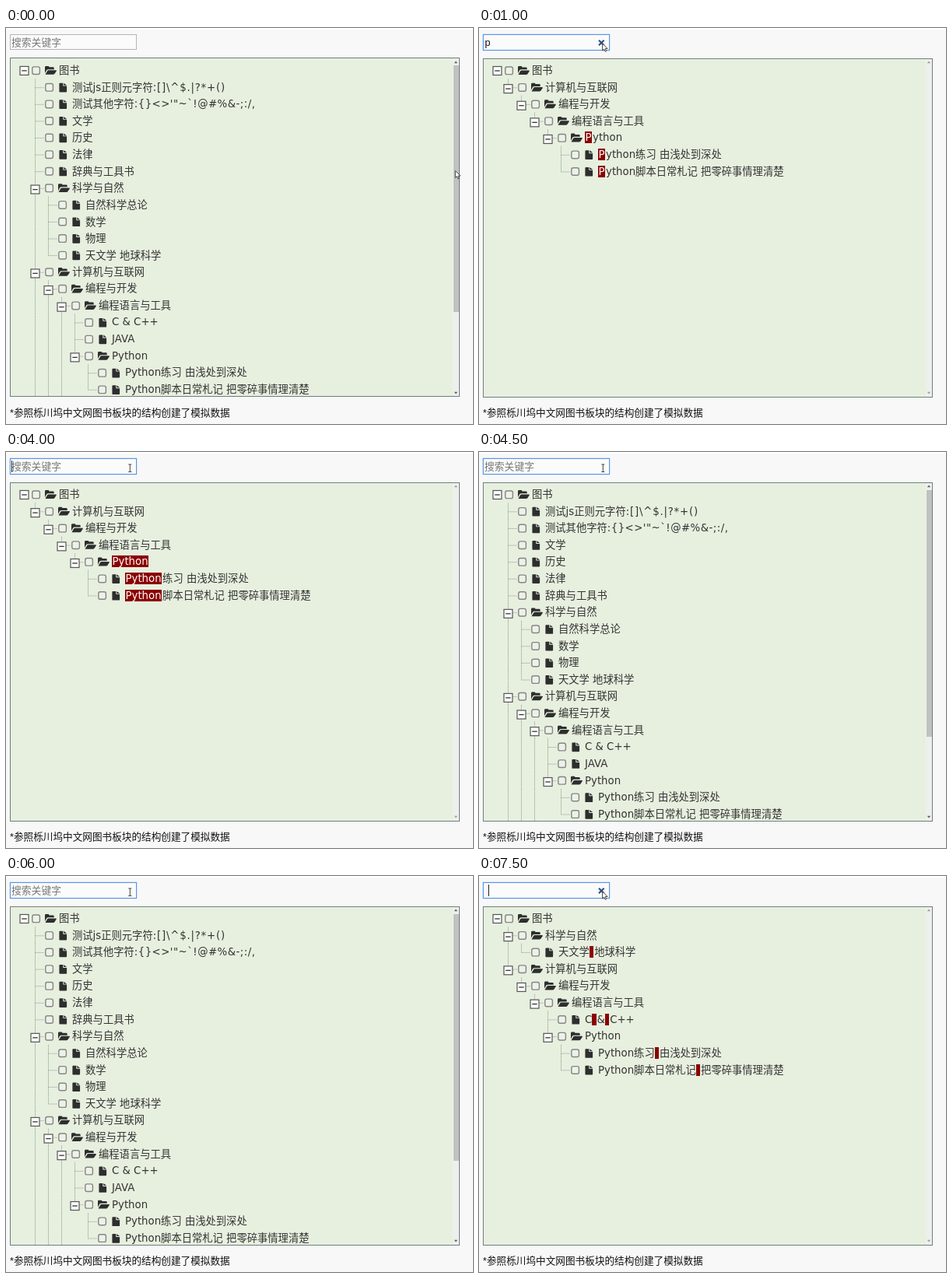
Animation of 600 by 509 pixels, one loop 8 s. Source, as an HTML page:

```html
<!DOCTYPE html>
<html lang="zh-CN">
<head>
<meta charset="utf-8">
<title>Tree search</title>
<style>
html, body { margin: 0; width: 100%; height: 100%; overflow: hidden; background: #f8f8f8; }
#stage {
  position: absolute; left: 0; top: 0; width: 600px; height: 509px; overflow: hidden;
  background: linear-gradient(#fff 2px, #f8f8f8 2px);
}
#scene { position: absolute; inset: 0; }
#scene div, #scene svg, .label { position: absolute; box-sizing: border-box; }
#scene > svg { left: 0; top: 0; }
#box {
  left: 5px; top: 8px; width: 163px; height: 21px; background: #fbfbfb;
  border: 1px solid #5596e6; box-shadow: 0 0 1px #5596e6;
}
#query {
  left: 7.5px; top: 9px; line-height: 19px; white-space: pre; color: #111;
  font-size: 12.8px; font-family: "Liberation Sans", "Noto Sans CJK SC", "Noto Sans CJK", sans-serif;
}
#query.empty { left: 7px; color: #777; }
#caret { top: 11px; width: 1px; height: 15px; background: #222; }
#panel { left: 5px; top: 39px; width: 578px; height: 436px; border: 1px solid #6c7f7c; background: #e7f0df; }
#bar { left: 573.5px; top: 40px; width: 8.5px; height: 434px; background: #eeefec; }
#thumb { left: 574.5px; top: 48.5px; width: 7px; height: 317px; background: #c0c1c0; }
#tree { inset: 0; clip-path: inset(40px 27px 35px 6px); transform-origin: 0 0; }
.label {
  white-space: pre; line-height: 22px; color: #333;
  font-size: 13.3px; font-family: "DejaVu Sans", "Noto Sans CJK SC", "Noto Sans CJK", sans-serif;
}
mark { background: #8b0000; color: #fff; padding: 0 .5px; margin-right: 1px; }
#note {
  left: 5px; top: 485px; line-height: 20px; white-space: pre; color: #111;
  font-size: 12.64px; font-family: "Liberation Sans", "Noto Sans CJK SC", "Noto Sans CJK", sans-serif;
}
/* before the field takes focus */
.idle #box { height: 20px; border-color: #b4b4b4; box-shadow: none; }
.idle #panel, .idle #bar, .idle #thumb { transform: translateY(-1px); }
.idle #tree { transform: scaleY(.9985); }
.idle #note { transform: translateY(-.5px); }
</style>
</head>
<body>
<div id="stage">
  <div id="scene">
    <div id="box"></div>
    <div id="query"></div>
    <div id="caret"></div>
    <div id="panel"></div>
    <div id="bar"></div>
    <div id="thumb"></div>
    <div id="tree"></div>
    <div id="note">*参照栎川坞中文网图书板块的结构创建了模拟数据</div>
    <svg width="600" height="509">
      <g id="arrows"><path d="M575.8 45.2h4.4l-2.2-2.6zM575.8 467.8h4.4l-2.2 2.6z"/></g>
      <path id="clear" d="M154 15.7l6.6 6.6M160.6 15.7l-6.6 6.6" stroke="#2c5285" stroke-width="2.2"/>
      <path id="beam" d="M157.3 16h4M157.3 25.5h4M159.3 16v9.5" fill="none" stroke="#444"/>
      <path id="pointer" d="M0 0v9l2.1-1.9 1.5 3.3 1.5-.7-1.4-3.2h2.8z" fill="#fff" stroke="#333" stroke-width=".9"/>
    </svg>
  </div>
</div>
<script>
const $ = id => document.getElementById(id);
const STEP = 500, PITCH = 21.62, TOP = 54.8;

// more: further siblings follow below the visible area
const node = (text, kids, extra) => ({ text, kids, ...extra });
const root = node('图书', [
  node('测试js正则元字符', null, { tail: ':[]\\^$.|?*+()', gap: .8 }),
  node('测试其他字符', null, { tail: ':{}<>\'"~`!@#%&-;:/,', gap: .48 }),
  node('文学'), node('历史'), node('法律'), node('辞典与工具书'),
  node('科学与自然', [
    node('自然科学总论'), node('数学'), node('物理'), node('天文学 地球科学')
  ]),
  node('计算机与互联网', [
    node('编程与开发', [
      node('编程语言与工具', [
        node('C & C++'), node('JAVA'),
        node('Python', [
          node('Python练习 由浅处到深处'),
          node('Python脚本日常札记 把零碎事情理清楚')
        ])
      ], { more: true })
    ], { more: true })
  ], { more: true })
]);

// [typed text, applied filter, caret shown]
const prefixes = [...'python'].map((_, i) => 'python'.slice(0, i + 1));
const states = [
  ['', '', 0], ['p', '', 1],
  ...prefixes.map(s => [s, s, 0]),
  ['', 'python', 1], ['', '', 0],
  ['&', '&', 0], ['', '&', 1],
  ['', '', 0], ['', '', 1],
  [' ', '', 1], [' ', ' ', 1]
];

const escapeHtml = s => s.replace(/&/g, '&amp;').replace(/</g, '&lt;').replace(/>/g, '&gt;');

function highlight(text, filter) {
  if (!filter) return escapeHtml(text);
  return text.split(new RegExp(`(${filter})`, 'i'))
    .map((part, i) => i % 2 ? `<mark>${escapeHtml(part)}</mark>` : escapeHtml(part)).join('');
}

const visible = (n, filter) =>
  (n.text + (n.tail || '')).toLowerCase().includes(filter) ||
  (n.kids || []).some(k => visible(k, filter));

function flatten(n, filter, depth = 0, last = true, bars = [], out = []) {
  out.push({ n, depth, last, bars });
  const kids = (n.kids || []).filter(k => visible(k, filter));
  const inner = depth && !last ? [...bars, depth] : bars;
  kids.forEach((k, i) => {
    const end = i === kids.length - 1 && !(k.more && !filter);
    flatten(k, filter, depth + 1, end, inner, out);
  });
  return out;
}

const column = depth => depth ? 20.5 + 17 * depth : 23.5;

const folder = (x, y) =>
  `<path transform="translate(${x} ${y})" fill="#2e2e2e" d="M0 3.6V-4.2q0-1.3 1.3-1.3H4.2q1.2 0 1.2 1.3H10.4q1.3 0 1.3 1.3V-1.3H4.2q-1.4 0-2.2 1.2zM.5 5.3L3 1q.6-1.2 1.8-1.2H14.2q1.2 0 .5 1.2L12.5 4.3q-.6 1-1.8 1z"/>`;
const file = (x, y) =>
  `<path transform="translate(${x} ${y})" fill="#2e2e2e" d="M1-5.8H5V-1.9H9.8V5q0 .9-.9.9H1Q.1 5.9.1 5V-4.9Q.1-5.8 1-5.8zM6-5.8L9.8-2.8H6z"/>`;

function drawRow({ n, depth, last, bars }, i, filter) {
  const y = TOP + i * PITCH, top = y - PITCH / 2, bottom = y + PITCH / 2;
  const x = column(depth), shift = 17 * depth, ey = y + (depth ? 1.7 : .2);
  let lines = bars.map(d => `M${column(d)} ${top}V${bottom}`).join('');
  if (depth) lines += `M${x} ${top}V${last ? y : bottom}M${x} ${y + .4}H${x + 11}`;
  let art = `<path d="${lines}" fill="none" stroke="#8f958b" stroke-dasharray="1 1"/>`;
  if (n.kids) {
    art += `<rect x="${x - 5.5}" y="${ey - 5.5}" width="11" height="11" fill="#fbfcfa" stroke="#555" stroke-width="1.2"/>` +
      `<path d="M${x - 3.2} ${ey}h6.4" stroke="#333" stroke-width="1.3"/>`;
  }
  art += `<rect x="${33.8 + shift}" y="${y - 4.8}" width="9.6" height="9.6" rx="2.2" fill="#edf2e8" stroke="#858585" stroke-width="1.4"/>`;
  art += n.kids ? folder(50 + shift, y - .2) : file(51.3 + shift, y + .2);
  const tail = n.tail ? `<span style="letter-spacing:${n.gap}px">${highlight(n.tail, filter)}</span>` : '';
  const label = `<span class="label" style="left:${68 + shift}px;top:${y - 10.8}px">${highlight(n.text, filter)}${tail}</span>`;
  return { art, label };
}

function drawTree(filter) {
  const rows = flatten(root, filter).map((r, i) => drawRow(r, i, filter));
  $('tree').innerHTML = `<svg width="600" height="509">${rows.map(r => r.art).join('')}</svg>` +
    rows.map(r => r.label).join('');
}

const show = (id, on) => { $(id).style.visibility = on ? 'visible' : 'hidden'; };

function render(index) {
  const [text, filter, caret] = states[index];
  const idle = index === 0;
  $('scene').className = idle ? 'idle' : '';
  $('query').className = text ? '' : 'empty';
  $('query').textContent = text || '搜索关键字';
  $('caret').style.left = (text ? 7.5 + $('query').offsetWidth : 7) + 'px';
  show('caret', caret);
  show('thumb', !filter);
  $('arrows').setAttribute('fill', filter ? '#a0a0a0' : '#606060');
  show('clear', text);
  show('beam', !text && !idle);
  show('pointer', text || idle);
  $('pointer').setAttribute('transform', idle ? 'translate(577.3 183.5)' : 'translate(158.6 20)');
  drawTree(filter);
}

let shown = -1;
const start = performance.now();
function tick() {
  const index = Math.floor((performance.now() - start) / STEP) % states.length;
  if (index !== shown) render(shown = index);
  requestAnimationFrame(tick);
}
tick();
</script>
</body>
</html>
```
